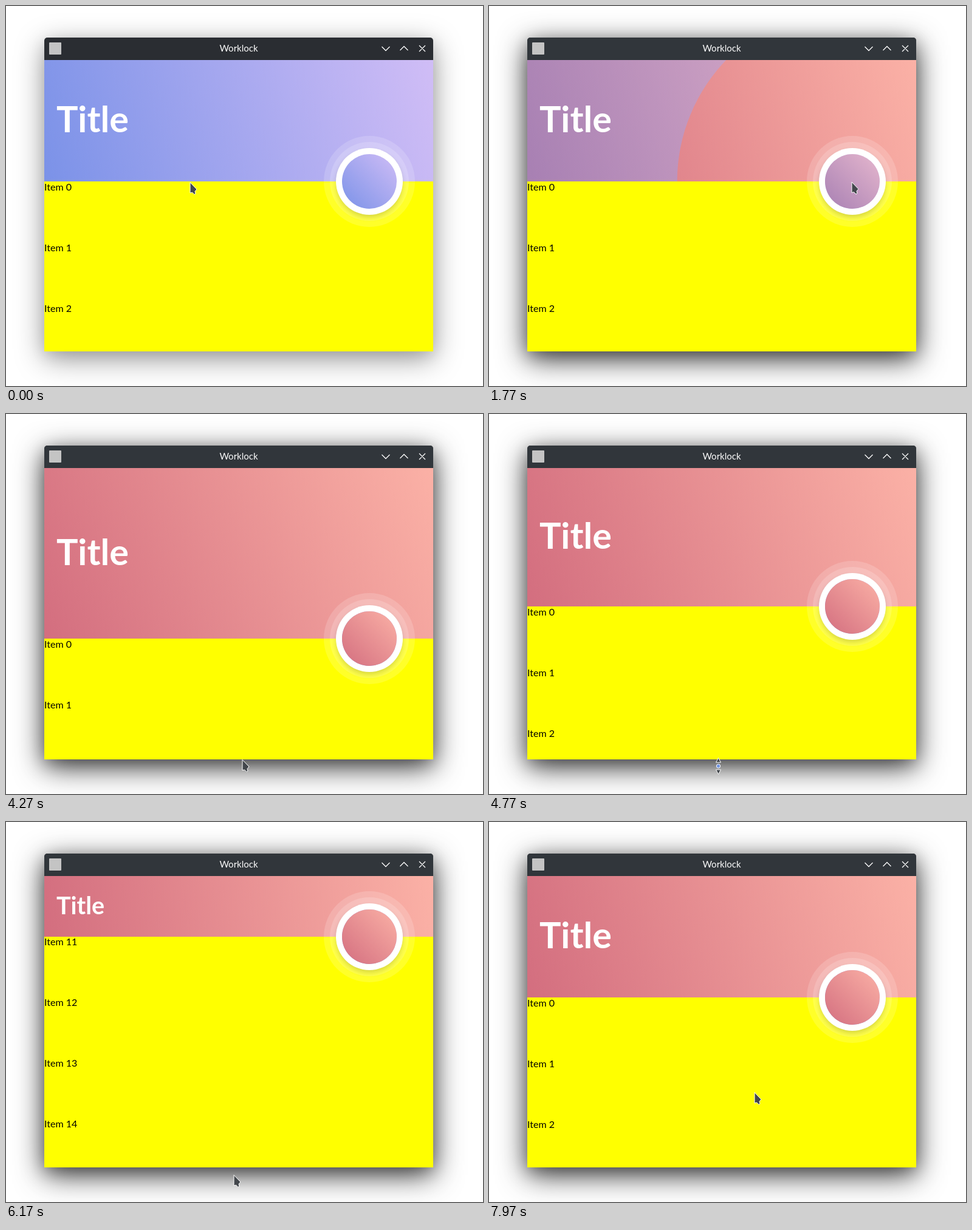
These frames come from a looping animation (785 by 626 pixels, 8 s). An HTML page:

```html
<!DOCTYPE html>
<html lang="en">
<head>
<meta charset="utf-8">
<title>Collapsing header</title>
<style>
  html, body { margin: 0; width: 100%; height: 100%; overflow: hidden; background: #fff; }
  #shadow { position: absolute; left: 63px; top: 52px; width: 640px; height: 517px; border-radius: 5px 5px 0 0; }
  svg { position: absolute; left: 0; top: 0; display: block; }
  text { font-family: Lato, "Open Sans", sans-serif; white-space: pre; }
</style>
</head>
<body>
<div id="shadow"></div>
<svg width="785" height="626" viewBox="0 0 785 626">
  <defs>
    <linearGradient id="blue" gradientUnits="userSpaceOnUse" x1="63" x2="703" y2="89">
      <stop stop-color="#7b92e8"/><stop offset="1" stop-color="#d0bdf6"/>
    </linearGradient>
    <linearGradient id="pink" gradientUnits="userSpaceOnUse" x1="63" x2="703" y2="89">
      <stop stop-color="#d36e7f"/><stop offset="1" stop-color="#fbb1a6"/>
    </linearGradient>
    <linearGradient id="blueDisc" x1="0" y1="1" x2="1" y2="0">
      <stop stop-color="#7b92e8"/><stop offset="1" stop-color="#d0bdf6"/>
    </linearGradient>
    <linearGradient id="pinkDisc" x1="0" y1="1" x2="1" y2="0">
      <stop stop-color="#d36e7f"/><stop offset="1" stop-color="#fbb1a6"/>
    </linearGradient>
    <clipPath id="body"><rect x="63" y="89" width="640" height="480"/></clipPath>
    <clipPath id="headerClip"><rect id="headerBox" x="63" y="89" width="640"/></clipPath>
    <filter id="blur" x="-30%" y="-30%" width="160%" height="160%"><feGaussianBlur stdDeviation="5"/></filter>
    <path id="bar" d="M63 89V57a5 5 0 0 1 5-5H698a5 5 0 0 1 5 5V89Z"/>
  </defs>

  <use href="#bar" fill="#2a2d32"/>
  <use href="#bar" id="activeBar" fill="#31363b"/>
  <rect x="71" y="60" width="20" height="20" rx="1" fill="#c4c4c4"/>
  <text x="383" y="75" font-size="15" text-anchor="middle" fill="#fcfcfc">Worklock</text>
  <path d="M618.5 67l6.500 6.500 6.500-6.500M648.500 73l6.500-6.500 6.500 6.500M680 65l10 10M690 65l-10 10" fill="none" stroke="#fcfcfc" stroke-width="1.3"/>

  <g clip-path="url(#body)">
    <rect x="63" y="89" width="640" height="480" fill="#ff0"/>
    <g id="items" font-size="16"></g>
    <g clip-path="url(#headerClip)">
      <rect x="63" y="89" width="640" height="480" fill="url(#blue)"/>
      <rect id="tint" x="63" y="89" width="640" height="480" fill="url(#pink)"/>
      <circle id="reveal" cx="598" fill="url(#pink)"/>
    </g>
    <text id="heading" x="83" font-weight="700" fill="#fff">Title</text>
    <g id="button">
      <circle r="75" fill="#fff" opacity=".16"/>
      <circle r="65" fill="#fff" opacity=".16"/>
      <circle cy="5" r="54" opacity=".16" filter="url(#blur)"/>
      <circle r="55" fill="#fff"/>
      <circle r="45" fill="url(#blueDisc)"/>
      <circle id="discTint" r="45" fill="url(#pinkDisc)"/>
    </g>
  </g>

  <g id="pointer" fill="#43474c" stroke="#fff" stroke-linejoin="round">
    <path id="arrow" d="M.5 .5V18L4 17 7.500 20.500 9.500 19 8.500 15.500 11.500 12Z"/>
    <g id="resize">
      <path d="M0-13.500L4-6H-4ZM0 13.500L4 6H-4Z"/>
      <circle r="3.200" fill="#6f93e0"/>
    </g>
  </g>
</svg>
<script>
const LOOP = 8000, LEFT = 63, TOP = 89, ROW = 100, OPEN = 200, CLOSED = 100;
const SCROLL_START = 5170, SCROLL_END = 7870, FARTHEST = 1315;
const $ = id => document.getElementById(id);
const set = (id, attrs) => { for (const k in attrs) $(id).setAttribute(k, attrs[k]); };
const ramp = (t, from, to) => Math.min(1, Math.max(0, (t - from) / (to - from)));
const mix = (a, b, p) => a + (b - a) * p;
const inOutQuad = p => p < .5 ? 2 * p * p : 1 - 2 * (1 - p) ** 2;

// While the list scrolls, the screen refreshes only every 150 ms
const refresh = t => t < 5330 || t > 7600 ? t
  : Math.max(5330, 5410 + 150 * Math.floor((t - 5410) / 150));

// Pointer moves: start, end, target x and y
const moves = [
  [400, 800, 482, 300],
  [1100, 1530, 596.5, 289.5],
  [2170, 2400, 607.5, 296],
  [3600, 4270, 388.5, 569],
  [4300, 4480, 377.5, 580],
  [4850, 5150, 412, 510],
  [5570, 6160, 374.5, 581],
  [6310, 6610, 413, 530],
  [6930, 7970, 436.5, 445]
];

function pointerAt(t) {
  let x = 302.5, y = 290;
  for (const [from, to, toX, toY] of moves) {
    const p = ramp(t, from, to);
    x = mix(x, toX, p);
    y = mix(y, toY, p);
  }
  return { x, y };
}

// Dragging below the press point stretches the header by half the distance
const pullAt = t => t < 3600 ? 0 : Math.max(0, (pointerAt(Math.min(t, 4300)).y - 407) / 2);

function scrollAt(t) {
  if (t < SCROLL_START) return -pullAt(t) * (1 - inOutQuad(ramp(t, 4300, 5105)));
  return FARTHEST * Math.sin(Math.PI * ramp(t, SCROLL_START, SCROLL_END));
}

const pinkAt = t => t < 2830 ? ramp(t, 1670, 1870) : ramp(t, 3470, 3670);

const rows = Array.from({ length: 7 }, () => {
  const row = document.createElementNS("http://www.w3.org/2000/svg", "text");
  row.setAttribute("x", LEFT);
  return $("items").appendChild(row);
});

function drawWindow(active) {
  const strength = mix(.5, 1, active);
  $("shadow").style.boxShadow =
    `0 12px 48px rgba(0,0,0,${.8 * strength}), 0 6px 24px rgba(0,0,0,${.2 * strength})`;
  set("activeBar", { opacity: active });
}

function drawHeader(height, pink) {
  const bottom = TOP + height, size = mix(39.5, 59.4, ramp(height, CLOSED, OPEN));
  set("headerBox", { height });
  set("blue", { y1: bottom });
  set("pink", { y1: bottom });
  set("tint", { opacity: pink });
  set("discTint", { opacity: pink });
  set("reveal", { cy: bottom, r: 571 * pink });
  set("heading", { y: TOP + height / 2 + size * .325, "font-size": size });
  set("button", { transform: `translate(598 ${bottom})` });
}

function drawItems(scroll) {
  const first = Math.max(0, Math.floor(scroll / ROW) - 1);
  rows.forEach((row, i) => {
    row.textContent = "Item " + (first + i);
    row.setAttribute("y", TOP + OPEN - scroll + (first + i) * ROW + 15);
  });
}

function drawPointer(t) {
  const { x, y } = pointerAt(t), onBorder = t < SCROLL_START && y > 570;
  set("pointer", { transform: `translate(${x} ${y})` });
  set("arrow", { display: onBorder ? "none" : "inline" });
  set("resize", { display: onBorder ? "inline" : "none" });
}

function render(time) {
  const t = refresh(time), scroll = Math.round(scrollAt(t));
  drawWindow(ramp(t, 1670, 1770));
  drawItems(scroll);
  drawHeader(Math.max(CLOSED, OPEN - scroll), pinkAt(t));
  drawPointer(t);
}

const start = performance.now();
function tick() {
  render((performance.now() - start) % LOOP);
  requestAnimationFrame(tick);
}
tick();
</script>
</body>
</html>
```
